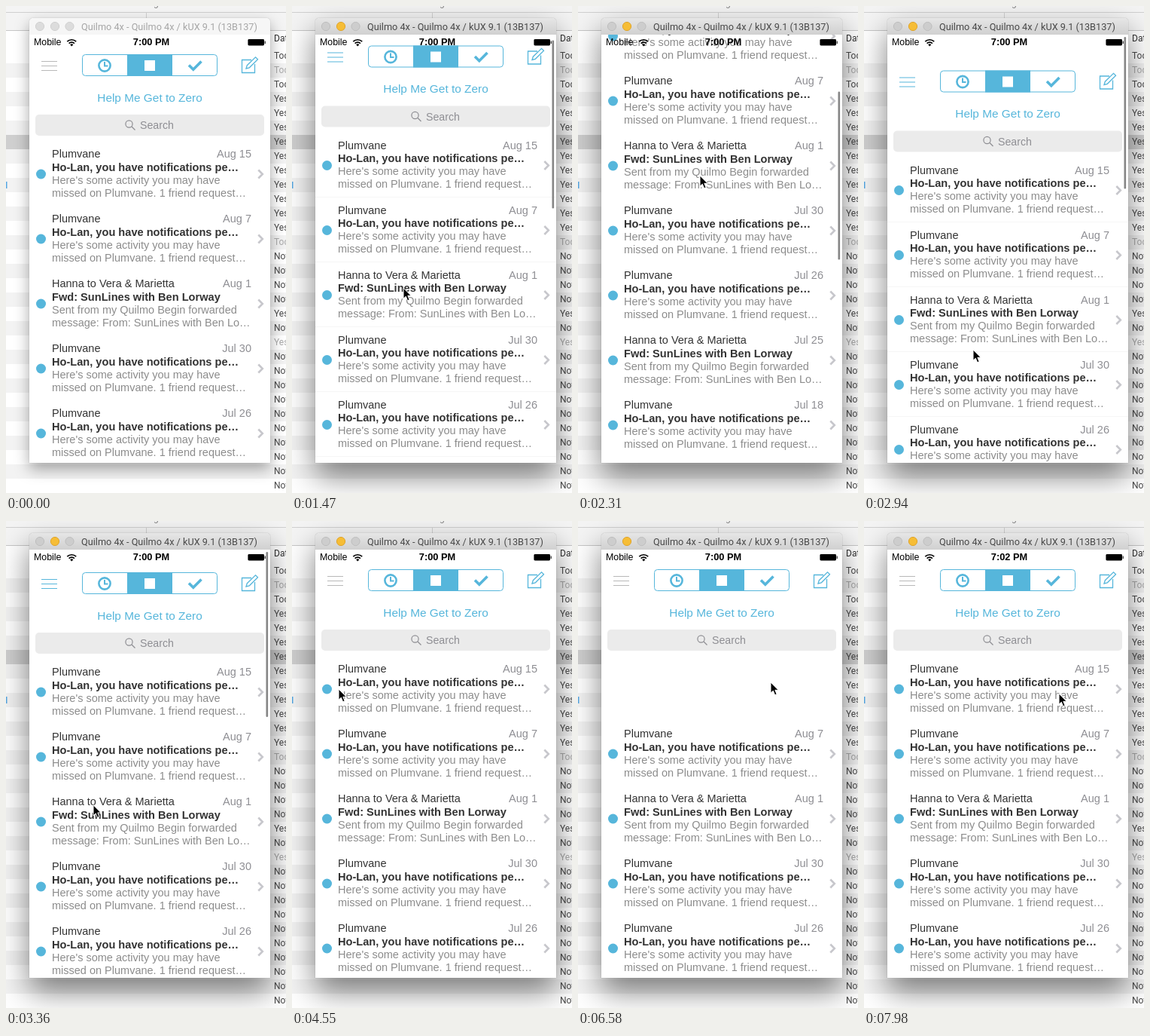
These frames come from a looping animation (372x646 px, 8000 ms). An HTML page:

```html
<!DOCTYPE html>
<html lang="en">
<head>
<meta charset="utf-8">
<title>Inbox swipe</title>
<style>
html, body { margin: 0; width: 100%; height: 100%; overflow: hidden; background: #fff; }
#stage { position: relative; width: 372px; height: 646px; overflow: hidden; }
svg { position: absolute; left: 0; top: 0; display: block; }
#win {
  position: absolute; left: 31px; top: 16px; width: 320px; height: 590px;
  border-radius: 5px 5px 0 0; overflow: hidden; background: #fff;
  box-shadow: 0 0 1px rgba(0,0,0,.4), 0 8px 20px rgba(0,0,0,.35);
}
#win.on { box-shadow: 0 0 1px rgba(0,0,0,.5), 0 18px 40px rgba(0,0,0,.5); }
text { font-family: "Liberation Sans", Arial, sans-serif; white-space: pre; }
.ui { font-family: Roboto, "Open Sans", sans-serif; }
.bar { fill: #f6f6f6; }
.on .bar { fill: url(#chrome); }
.title { fill: #a6a6a6; font-size: 12.7px; }
.on .title { fill: #484848; }
.light { fill: #dcdcdc; stroke: #cfcfcf; }
.on .light { fill: #cdcdcd; stroke: #bdbdbd; }
.on .light.mid { fill: #f6bd36; stroke: #dfa42a; }
.line { fill: none; stroke: #56b6db; }
.from { font-size: 14.5px; fill: #333; }
.date { font-size: 14.5px; fill: #8e8e93; text-anchor: end; }
.subject { font-size: 14.6px; font-weight: bold; fill: #333; }
.preview { font-size: 14.5px; fill: #8c8c8c; }
</style>
</head>
<body>
<div id="stage">
  <svg id="desk" width="372" height="646"></svg>
  <div id="win">
    <svg width="320" height="590" viewBox="31 16 320 590">
      <defs>
        <linearGradient id="chrome" x2="0" y2="1">
          <stop stop-color="#e6e6e6"/><stop offset="1" stop-color="#d0d0d0"/>
        </linearGradient>
        <clipPath id="screen"><path d="M31 38h320v568h-320z"/></clipPath>
        <clipPath id="slot"><path d="M31 179h320v86h-320z"/></clipPath>
      </defs>
      <g clip-path="url(#screen)">
        <g id="page">
          <path id="menu" fill="none" stroke-width="1.2" d="M47 73.5h21M47 79.5h21M47 85.5h21"/>
          <rect class="line" x="101.5" y="64.5" width="179" height="28" rx="4"/>
          <path fill="#56b6db" d="M161 64h60v29h-60z"/>
          <circle class="line" cx="131" cy="79" r="7.6" stroke-width="2.6"/>
          <path class="line" stroke-width="2" d="M131 74v5.5h4.5"/>
          <path fill="#fff" d="M184 72h14v14h-14z"/>
          <path class="line" stroke-width="3.6" d="M243 78.5l5.8 5.8L259.5 73.5"/>
          <path class="line" stroke-width="1.3" d="M326 71.5H313.5V88.5H330.5V77M319 83l1.3-4.3L331.5 67.8l3 3L323.3 81.8z"/>
          <text x="191" y="126.5" font-size="15.4" text-anchor="middle" fill="#56b6db">Help Me Get to Zero</text>
          <rect x="39" y="144" width="304" height="28" rx="5" fill="#ebebeb"/>
          <g fill="none" stroke="#8e8e93" stroke-width="1.2"><circle cx="163.5" cy="156.5" r="4.6"/><path d="M167 160l4.5 4.5"/></g>
          <text x="178" y="163" font-size="14.2" fill="#8e8e93">Search</text>
          <g clip-path="url(#slot)">
            <g id="done">
              <path id="green" fill="#0f0" d="M31 179h320v86h-320z"/>
              <path id="tick" fill="none" stroke="#fff" stroke-width="4" d="M-24 227l6.7 6L-4 219.5"/>
            </g>
          </g>
          <g id="list"></g>
        </g>
        <rect id="thumb" x="345.5" width="2.6" rx="1.3" fill="#858585"/>
        <text x="37" y="52" font-size="12.4">Mobile</text>
        <g fill="none" stroke="#000" stroke-width="1.7"><path d="M81.3 47.2a8.4 8.4 0 0 1 11.9 0M83.6 49.6a5.1 5.1 0 0 1 7.3 0"/></g>
        <path d="M85.2 51.2a3 3 0 0 1 4.1 0L87.2 53.4z"/>
        <text id="clock" x="193" y="52.3" font-size="12.8" font-weight="bold" text-anchor="middle"></text>
        <rect x="321.4" y="44" width="21.6" height="8.4" rx="1.4"/>
        <path d="M343.7 46.4h1v3.6h-1z"/>
      </g>
      <path class="bar" d="M31 16h320v22h-320z"/>
      <circle class="light" cx="45" cy="27" r="5.6"/>
      <circle class="light mid" cx="65" cy="27" r="5.6"/>
      <circle class="light" cx="84.5" cy="27" r="5.6"/>
      <text class="ui title" x="100" y="31.5">Quilmo 4x - Quilmo 4x / kUX 9.1 (13B137)</text>
    </svg>
  </div>
  <svg width="372" height="646">
    <path id="cursor" stroke="#fff" stroke-width="1" stroke-linejoin="round" d="M0 0V14.2L3.3 11.2L5.6 16.8L8.1 15.7L5.8 10.3H10.2Z"/>
  </svg>
</div>
<script>
const $ = id => document.getElementById(id);

// The mail window behind the simulator
function drawDesk() {
  const rect = (x, y, w, h, fill) => `<rect x="${x}" y="${y}" width="${w}" height="${h}" fill="${fill}"/>`;
  const label = (s, y, fill) => `<text class="ui" x="356" y="${y + 4}" font-size="12" fill="${fill}">${s}</text>`;
  const words = { T: 'Today', Y: 'Yesterday', N: 'Nov' };
  const days = 'TtTYYYYYYYYYYtNNNNYNy' + 'N'.repeat(10);
  let out = rect(0, 0, 372, 32, '#f4f4f4') + rect(0, 8, 372, 1, '#d0d0d0') +
    rect(186, 9, 1, 23, '#d0d0d0') + rect(0, 32, 372, 1, '#c6c6c6') +
    '<text class="ui" x="196" y="0" font-size="12" fill="#888">g</text>' + label('Date', 43, '#333');
  [...days].forEach((d, i) => {
    const y = 57 + 19 * i;
    out += rect(0, y, 372, 19, i === 6 ? '#cfcfcf' : i % 2 ? '#f3f3f3' : '#fff');
    out += label(words[d.toUpperCase()], y + 9, d === d.toLowerCase() ? '#aaa' : '#484848');
  });
  $('desk').innerHTML = out + rect(0, 233, 1.5, 9, '#58a9e4');
}

const notice = ['Plumvane', 'Ho-Lan, you have notifications pe…',
  "Here's some activity you may have", 'missed on Plumvane. 1 friend request…'];
const forward = ['Hanna to Vera & Marietta', 'Fwd: SunLines with Ben Lorway',
  'Sent from my Quilmo Begin forwarded', 'message: From: SunLines with Ben Lo…'];
const dates = ['Aug 15', 'Aug 7', 'Aug 1', 'Jul 30', 'Jul 26', 'Jul 25', 'Jul 18', 'Jul 16', 'Jul 12'];

function mailRow(date, i) {
  const mail = i === 2 || i === 5 ? forward : notice;
  const line = (cls, s, x, y) => `<text class="${cls}" x="${x}" y="${y}">${s.replace('&', '&amp;')}</text>`;
  return `<g transform="translate(0 ${86 * i})"><g id="row${i}">
    <path fill="#fff" d="M31 179h320v86h-320z"/>
    <circle cx="46.5" cy="223" r="6.5" fill="#56b6db"/>
    ${line('from', mail[0], 61, 201)}${line('date', date, 326, 201)}
    ${line('subject', mail[1], 61, 218.5)}
    ${line('preview', mail[2], 61, 235.5)}${line('preview', mail[3], 61, 252.5)}
    <path fill="none" stroke="#c7c7cc" stroke-width="2.6" d="M335.3 217.5l5.5 5.5l-5.5 5.5"/>
    </g><path fill="#dcdcdc" d="M31 265h320v1h-320z"/></g>`;
}

drawDesk();
$('list').innerHTML = dates.map(mailRow).join('');

// Tables of [time, values...]
const pointer = [
  [490, 188, 2], [700, 165, 200], [910, 148, 412], [980, 146, 405], [1330, 146, 405],
  [1400, 147, 392], [1470, 148, 374], [1700, 158, 275], [2000, 164, 208], [2170, 163, 204],
  [2240, 163, 212], [2310, 162, 225], [2940, 145, 456], [3010, 144, 463], [3220, 138, 440],
  [3640, 72, 250], [3850, 58, 226], [3920, 62, 223], [4550, 62, 223], [4900, 160, 212],
  [5320, 253, 203], [5600, 279, 206], [5810, 284, 208], [6090, 256, 214], [7000, 256, 214],
  [7420, 185, 217], [7770, 185, 217], [7980, 259, 229]
];
const scroll = [
  [1330, 0], [1400, 2], [1470, 11.5], [1700, 110], [2000, 183], [2170, 198], [2240, 196],
  [2310, 183], [2809, 0], [2940, -21.5], [3010, -25], [3080, -20], [3220, -8], [3430, -2], [3640, 0]
];
const thumbFade = [[1330, 0], [1400, 1], [3640, 1], [3850, 0]];
const doneFade = [[6160, 1], [6580, 0]];
const slideOff = [[6160, 184], [6580, 320], [7000, 320], [7420, 0]];

function at(table, t) {
  const n = table.findIndex(k => k[0] > t);
  if (n === 0) return table[0].slice(1);
  if (n < 0) return table[table.length - 1].slice(1);
  const a = table[n - 1], b = table[n], p = (t - a[0]) / (b[0] - a[0]);
  return a.slice(1).map((v, i) => v + (b[i + 1] - v) * p);
}

function swipe(t, x) {
  if (t < 4550) return 0;
  return t < 6160 ? Math.max(0, x - 71.5) : at(slideOff, t)[0];
}

const move = (id, x, y) => $(id).setAttribute('transform', `translate(${x} ${y})`);

function draw(t) {
  const [x, y] = at(pointer, t);
  const [off] = at(scroll, t);
  const dx = swipe(t, x);

  $('win').classList.toggle('on', t >= 1190);
  $('cursor').style.visibility = t < 490 ? 'hidden' : 'visible';
  move('cursor', x, y);
  $('clock').textContent = t < 7630 ? '7:00 PM' : '7:02 PM';

  move('page', 0, -off);
  $('menu').setAttribute('stroke', off ? '#56b6db' : '#b8b8b8');
  const top = 41 + 0.396 * Math.max(0, off);
  $('thumb').setAttribute('y', top);
  $('thumb').setAttribute('height', 223 + Math.min(0, off));
  $('thumb').setAttribute('opacity', at(thumbFade, t)[0]);

  move('row0', dx, 0);
  move('tick', 31 + dx - 7.5, 0);
  $('done').setAttribute('opacity', dx ? at(doneFade, t)[0] : 0);
}

// The picture steps every 70 ms
function tick() {
  const t = performance.now() % 8000;
  draw(Math.floor(t / 70) * 70);
  requestAnimationFrame(tick);
}
tick();
</script>
</body>
</html>
```
